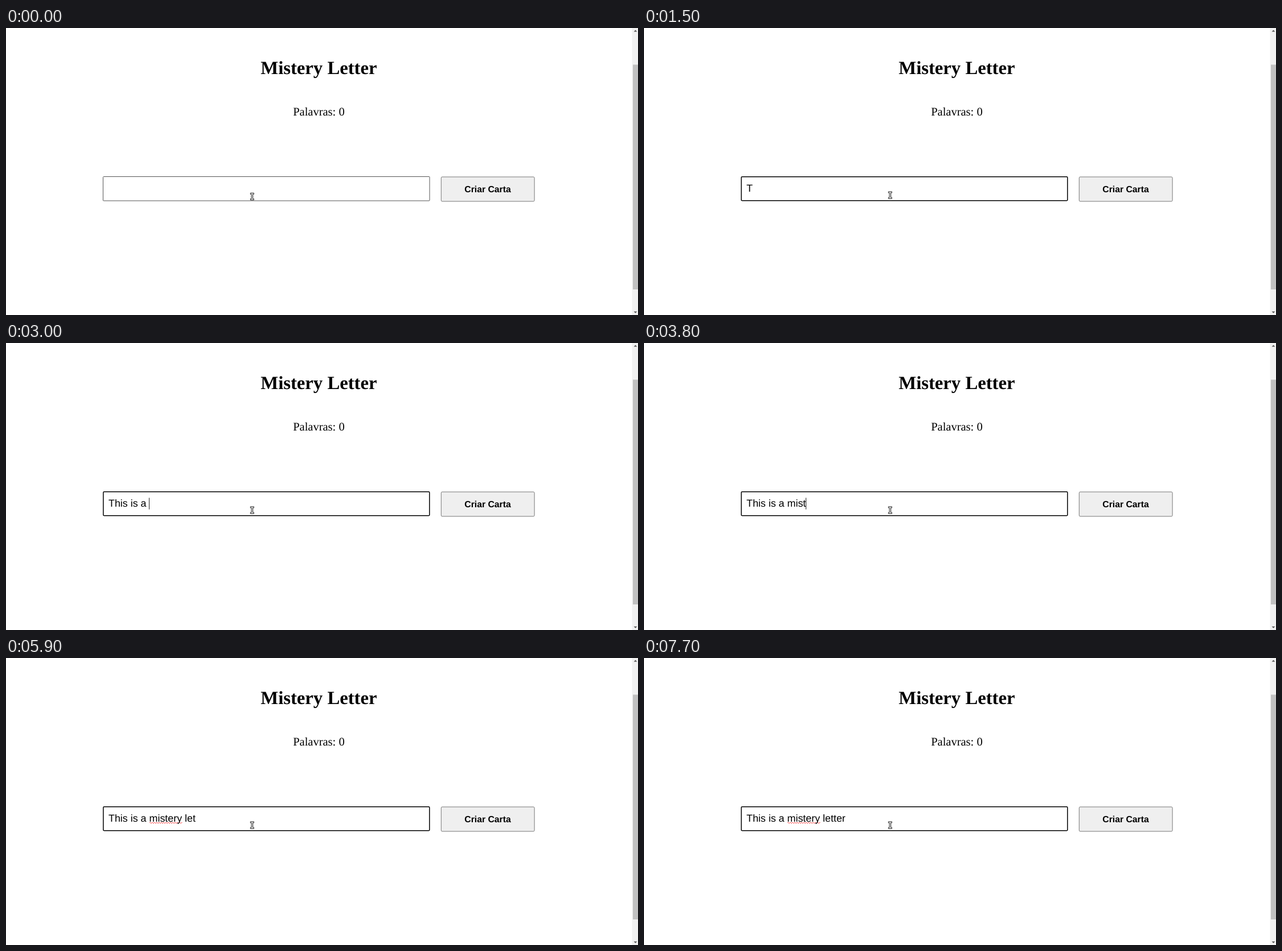
Write an HTML page that moves like this. It is 1110 by 505 pixels and loops after 8 s.

```html
<!DOCTYPE html>
<html lang="pt">
<head>
<meta charset="utf-8">
<title>Mistery Letter</title>
<style>
  html, body { margin: 0; width: 100%; height: 100%; overflow: hidden; background: #fff; }
  svg { display: block; width: 1110px; height: 505px; }
  text { text-rendering: geometricPrecision; white-space: pre; }
  .serif { font-family: "Liberation Serif", "Times New Roman", serif; text-anchor: middle; }
  .sans { font-family: "Liberation Sans", Arial, sans-serif; }
  #typed { font-size: 17.89px; font-kerning: none; }
</style>
</head>
<body>
<svg viewBox="0 0 1110 505">
  <text class="serif" x="549.4" y="80.5" font-size="32.7" font-weight="700">Mistery Letter</text>
  <text class="serif" x="549.4" y="153.9" font-size="20.5">Palavras: 0</text>

  <rect id="field" fill="#fff"/>
  <path id="squiggle" fill="none" stroke="#f00" stroke-width=".75"/>
  <text id="typed" class="sans" x="180" y="288.2"></text>
  <rect id="caret" y="272.4" width="1" height="20.4" fill="#222"/>

  <rect x="764.3" y="262" width="163.8" height="43" rx="1.8" fill="#efefef" stroke="#767676"/>
  <text class="sans" x="846" y="288.5" font-size="15.75" font-weight="700" text-anchor="middle">Criar Carta</text>

  <rect x="1099.5" width="10.5" height="505" fill="#f1f1f1"/>
  <rect x="1101" y="64.5" width="9" height="395.5" fill="#c1c1c1"/>
  <path d="M1102.6 6.4h5.8l-2.9-3zM1102.6 498.8h5.8l-2.9 3z" fill="#505050"/>

  <path id="pointer" d="M-3 -6.2h6v2.2h-1.7v8h1.7v2.2h-6v-2.2h1.7v-8h-1.7z"
        fill="#ddd" stroke="#111" stroke-width=".85" stroke-linejoin="round"/>
</svg>
<script>
const LOOP = 8000;
const PHRASE = "This is a mistery letter";
const FOCUS_AT = 700, SPELLCHECK_AT = 4700;

// When each character appears
const KEYS = [900, 1700, 1900, 2100, 2200, 2400, 2600, 2700, 2800, 3000, 3300, 3600,
  3700, 3800, 3900, 4100, 4400, 4700, 5000, 5100, 5300, 6600, 7100, 7100];
// Spans in which the blinking caret is hidden
const HIDDEN = [[0, FOCUS_AT], [1500, 1700], [5900, 6500], [7700, LOOP]];
const POINTER = [[0, 296.5], [400, 295.3], [500, 294.1]];

const [field, squiggle, typed, caret, pointer] =
  ["field", "squiggle", "typed", "caret", "pointer"].map(id => document.getElementById(id));

const setAttrs = (el, attrs) => {
  for (const name in attrs) el.setAttribute(name, attrs[name]);
};
const show = (el, on) => el.setAttribute("visibility", on ? "visible" : "hidden");

squiggle.setAttribute("d", "M252 290.1" + "q1 -2 2 0t2 0".repeat(14) + "q.7 -1.4 1.4 -.7");

function draw(t) {
  const focused = t >= FOCUS_AT;
  setAttrs(field, focused
    ? { x: 170.9, y: 261.75, width: 572.9, height: 41.9, rx: 1.5, stroke: "#000", "stroke-width": 1.5 }
    : { x: 170.5, y: 261.5, width: 573.5, height: 42.5, rx: 1, stroke: "#555", "stroke-width": 1 });

  const text = PHRASE.slice(0, KEYS.filter(at => at <= t).length);
  if (typed.textContent !== text) typed.textContent = text;
  const width = text ? typed.getComputedTextLength() : 0;
  caret.setAttribute("x", 180 + Math.floor(width));
  show(caret, !HIDDEN.some(([from, to]) => t >= from && t < to));
  show(squiggle, t >= SPELLCHECK_AT);

  const y = POINTER.filter(([at]) => at <= t).pop()[1];
  pointer.setAttribute("transform", `translate(432.3 ${y})`);
}

const start = performance.now();
function tick() {
  draw((performance.now() - start) % LOOP);
  requestAnimationFrame(tick);
}
tick();
</script>
</body>
</html>
```
